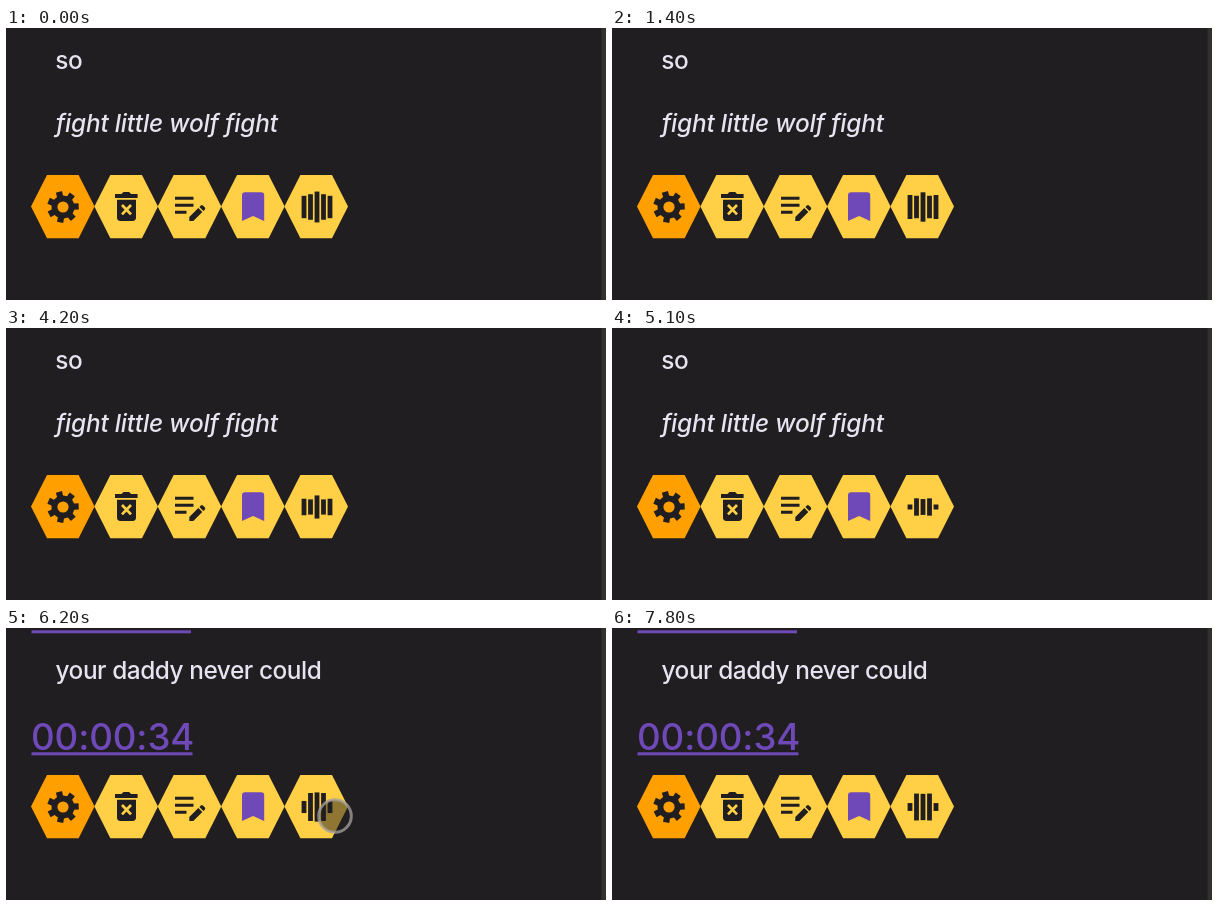
An HTML page that plays this animation: 600 px wide and 272 px high, repeating every 7900 ms.

```html
<!DOCTYPE html>
<html lang="en">
<head>
<meta charset="utf-8">
<title>Lyric notes</title>
<style>
  html, body { margin: 0; width: 100%; height: 100%; overflow: hidden; background: #201e20; }
  svg { display: block; width: 600px; height: 272px; }
  text { font-family: Inter, "Open Sans", sans-serif; font-optical-sizing: none; font-weight: 500; }
  .line { font-size: 24.4px; letter-spacing: -.45px; fill: #e8e3f1; }
  .italic { font-style: italic; letter-spacing: -.18px; }
  .stamp { font-size: 36.7px; letter-spacing: -.1px; fill: #7049b9; }
  .link { fill: #7049b9; }
  .dark { fill: #201e20; }
  .stroke { fill: none; stroke: #201e20; stroke-width: 2.9; }
</style>
</head>
<body>
<svg viewBox="0 0 600 272">
  <rect width="600" height="272" fill="#201e20"/>
  <rect x="595.5" width="4.5" height="272" fill="#32312d"/>

  <g id="before">
    <text class="line" x="49.3" y="40.6">so</text>
    <text class="line italic" x="49.7" y="103.5">fight little wolf fight</text>
  </g>
  <g id="after" visibility="hidden">
    <text class="stamp" x="25" y="0">00:00:31</text>
    <rect class="link" x="25.5" y="2.3" width="159.5" height="3"/>
    <text class="line" x="49.5" y="50.6">your daddy never could</text>
    <text class="stamp" x="25" y="122">00:00:34</text>
    <rect class="link" x="25.5" y="124.3" width="161" height="3"/>
  </g>

  <g id="cells"></g>

  <path id="gear" class="dark" fill-rule="evenodd"/>

  <g class="dark">
    <path d="M109 166h6.5l2-2h5.6l2 2h6.5v4h-22.6z"/>
    <path d="M111 171.7h19v17.8a3.4 3.4 0 0 1-3.4 3.4h-12.2a3.4 3.4 0 0 1-3.4-3.4z"/>
    <path d="M116 177l9 9.4m0-9.4l-9 9.4" stroke="#ffcf45" stroke-width="2.7"/>
  </g>

  <path class="stroke" d="M169 170.3h18.5M169 177.3h18.5M169 184.2h11.5"/>
  <path class="dark" d="M183.3 193v-4l9-9 4 4-9 9zM193.4 178.9l1.5-1.5q1-.8 2 0l2 2q.8 1 0 2l-1.5 1.5z"/>

  <path class="link" d="M236 193v-25.8a3 3 0 0 1 3-3h16.2a3 3 0 0 1 3 3V193l-11.1-4.9z"/>

  <g id="bars" class="dark"></g>

  <circle id="touch" r="16.3" fill="#201e20" fill-opacity=".5"
    stroke="#a5a29e" stroke-opacity=".75" stroke-width="3" visibility="hidden"/>
</svg>
<script>
  const LOOP = 7900, STEP = 100, CLICK = 5900, WAVE = 1500, MID = 179;
  const $ = id => document.getElementById(id);

  function add(parent, tag, attrs) {
    const el = document.createElementNS('http://www.w3.org/2000/svg', tag);
    for (const key in attrs) el.setAttribute(key, attrs[key]);
    return parent.appendChild(el);
  }

  for (let i = 0; i < 5; i++) {
    const x = 25 + i * 63.35;
    add($('cells'), 'path', {
      d: `M${x} 178.6l16-31.6h31.6l16 31.6-16 31.6h-31.6z`,
      fill: i ? '#ffcf45' : '#ff9f00'
    });
  }

  function gearPath(cx, cy, teeth) {
    const pts = [];
    const put = (r, a) => pts.push([cx + r * Math.cos(a), cy + r * Math.sin(a)].map(v => v.toFixed(2)).join(' '));
    for (let i = 0; i < teeth; i++) {
      const a = i * 2 * Math.PI / teeth - .04;
      put(11.6, a - .27);
      put(16, a - .2);
      put(16, a + .2);
      put(11.6, a + .27);
    }
    return `M${pts.join('L')}ZM${cx - 5.6} ${cy}a5.6 5.6 0 1 0 11.2 0a5.6 5.6 0 1 0 -11.2 0Z`;
  }
  $('gear').setAttribute('d', gearPath(57, MID, 7));

  // Bars mirror around the middle one: low height, high height, peak phase, sharpness.
  const kinds = [[13, 31, .03, 1], [10, 28, .12, 1], [5, 24, .94, 2.5]];
  const bars = [-2, -1, 0, 1, 2].map(i => ({
    kind: kinds[Math.abs(i)],
    el: add($('bars'), 'rect', { x: 308.6 + i * 6.5, width: 4.8 })
  }));

  // Pointer stops: time, x, y.
  const path = [[5300, 488, 225], [5600, 345, 190], [5800, 329, 188], [6200, 329, 188], [6400, 551, 17]];

  function touchAt(t) {
    const i = path.findIndex(p => p[0] >= t);
    if (i < 0 || t < path[0][0]) return null;
    const b = path[i], a = path[Math.max(0, i - 1)];
    const k = b === a ? 1 : (t - a[0]) / (b[0] - a[0]);
    return [a[1] + (b[1] - a[1]) * k, a[2] + (b[2] - a[2]) * k];
  }

  const show = (el, on) => el.setAttribute('visibility', on ? 'visible' : 'hidden');

  function draw(t) {
    for (const { kind: [low, high, peak, sharp], el } of bars) {
      const swing = .5 + .5 * Math.cos(2 * Math.PI * (t / WAVE - peak));
      const h = low + (high - low) * swing ** sharp;
      el.setAttribute('y', MID - h / 2);
      el.setAttribute('height', h);
    }
    show($('before'), t < CLICK);
    show($('after'), t >= CLICK);

    const spot = touchAt(t);
    show($('touch'), spot);
    if (spot) {
      $('touch').setAttribute('cx', spot[0]);
      $('touch').setAttribute('cy', spot[1]);
    }
  }

  const start = performance.now();
  function tick() {
    const t = (performance.now() - start) % LOOP;
    draw(Math.floor(t / STEP) * STEP);
    requestAnimationFrame(tick);
  }
  tick();
</script>
</body>
</html>
```
